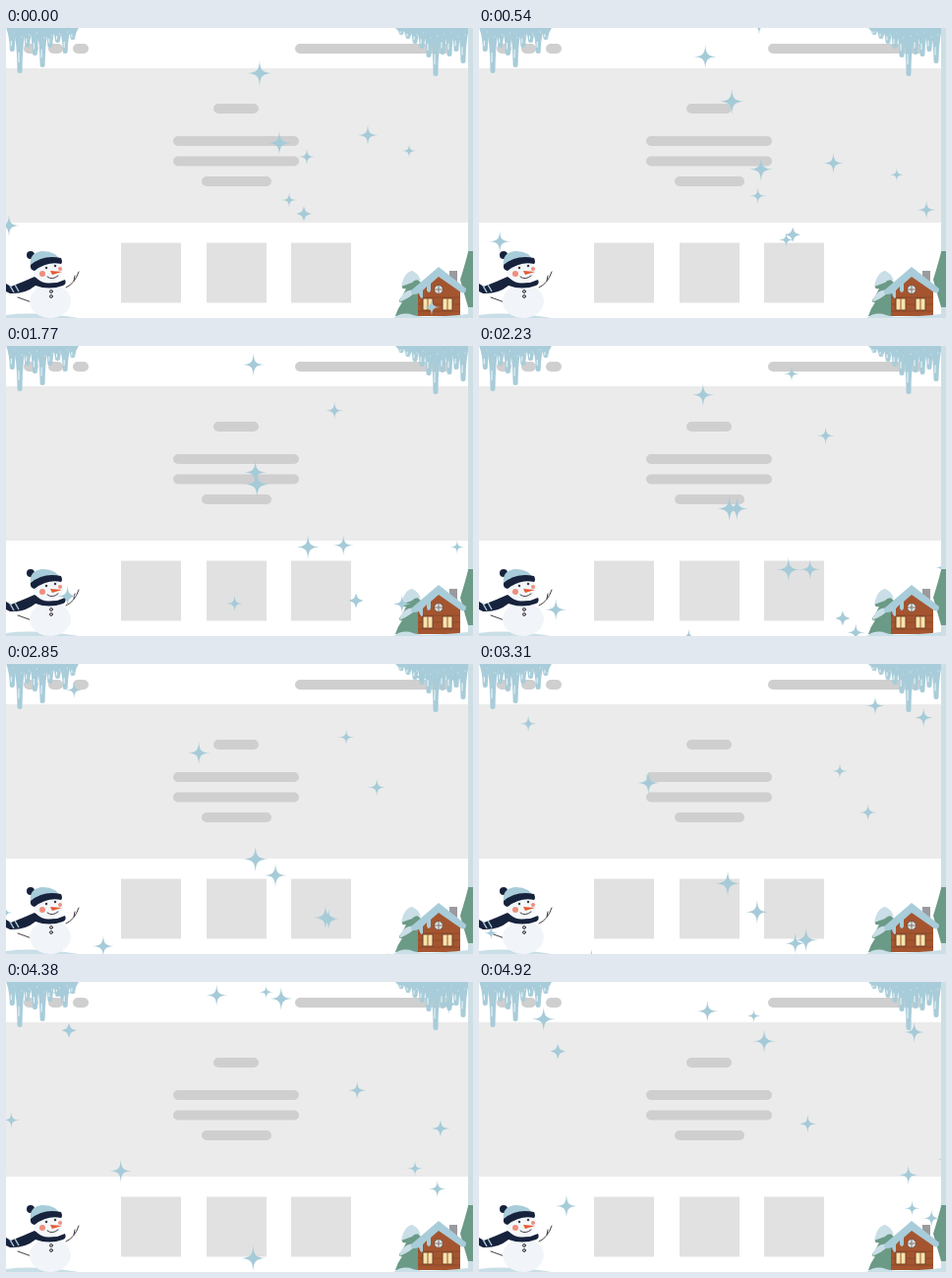
An HTML page that plays this animation: 475 px wide and 295 px high, repeating every 5000 ms.

```html
<!DOCTYPE html>
<html lang="en">
<head>
<meta charset="utf-8">
<title>Winter page decoration</title>
<style>
html, body { margin: 0; width: 100%; height: 100%; overflow: hidden; background: #fff; }
svg { display: block; width: 475px; height: 295px; }
.ice { fill: #a8ccd9; }
.snow { fill: #c9dee6; }
.navy { fill: #17223c; }
.pine { fill: #6b9a86; }
.line { fill: none; stroke: #443e45; stroke-linecap: round; }
</style>
</head>
<body>
<svg viewBox="0 0 475 295">
  <!-- page skeleton -->
  <path d="M0 41H470V198H0Z" fill="#ebebeb"/>
  <path d="M23 21h5M48 21h5M73 21h6M299 21h148M216 82h36M175 115h118M175 135.5h118M204 156h61"
        stroke="#cfcfcf" stroke-width="10" stroke-linecap="round"/>
  <path d="M117 249h61M204 249h61M290 249h61" stroke="#e1e1e1" stroke-width="61"/>
  <g id="icicles"></g>

  <!-- snowman -->
  <path class="snow" d="M0 292Q30 288 74 295H0Z"/>
  <path class="line" d="M61 264Q70 260 74 248M69 257L70 252M26 279L12 274"/>
  <ellipse cx="45" cy="278" rx="21" ry="17" fill="#f1f5f9"/>
  <path class="navy" d="M29 253Q44 264 60 256Q62 260 58 262Q44 267 30 262Q19 271 4 270L0 268V260L5 263Q18 258 29 253Z"/>
  <path d="M4 262l4 7M9 261l4 7" stroke="#a9c9d6" stroke-width="1.5"/>
  <ellipse cx="43" cy="246" rx="15" ry="13.500" fill="#f4f7fa"/>
  <circle class="navy" cx="25" cy="231" r="4"/>
  <path class="ice" d="M25 242Q23 229 36 227Q51 226 56 238Z"/>
  <path class="navy" d="M25 241Q38 230 56 234Q58 238 56 240Q42 237 29 247Q24 246 25 241Z"/>
  <circle cx="37" cy="250" r="3" fill="#ef8e7d"/>
  <circle cx="55" cy="245" r="2" fill="#ef8e7d"/>
  <path d="M45 247L57 248L47 251Z" fill="#e65a32"/>
  <path class="line" d="M41 244v.1M50 242v.1" stroke-width="2.500"/>
  <path class="line" d="M42 253Q47 257 53 252M46 268v.1M46 273v.1"/>
  <g class="line"><circle cx="46" cy="268" r="1.500"/><circle cx="46" cy="273" r="1.500"/></g>

  <!-- cabin and trees -->
  <path class="pine" d="M413 247Q418 257 426 262L432 293H396Q398 286 403 279Q399 280 400 277Q404 272 407 265Q402 266 403 262Q409 256 413 247Z"/>
  <path class="snow" d="M402 263Q405 248 413 247Q419 249 422 257Q416 255 413 259ZM400 279Q404 264 418 267Q412 274 400 279Z"/>
  <path class="pine" d="M470 228Q467 240 462 256L470 284Z"/>
  <path d="M451 247h8v16h-8z" fill="#9b9a9e"/>
  <path d="M419 268L440 249L462 268V293H419Z" fill="#a4552f"/>
  <path d="M419 274H462M419 281H462M419 288H462" stroke="#8b4527" stroke-width=".8"/>
  <path class="ice" d="M440 243L468 265Q468 271 463 269L440 253L432 260V267Q430 271 428 267V263L424 267V274Q422 277 420 270Q411 273 412 267Z"/>
  <circle cx="440" cy="266" r="4.500" fill="#d2e5e8" stroke="#7d4b39"/>
  <path d="M440 262v8M436 266h8" stroke="#7d4b39" stroke-width=".7"/>
  <path d="M424 275h10v12h-10zM444 275h10v12h-10z" fill="#f5e5ae" stroke="#74402d"/>
  <path d="M429 275v12M449 275v12" stroke="#a4552f"/>
  <path class="snow" d="M394 295Q404 288 414 292T470 291V295Z"/>

  <g id="stars" fill="#a6cbd8"></g>

  <!-- right edge -->
  <path d="M470 0H475V295H470Z" fill="#cddfe5"/>
  <path class="pine" d="M470 227H475V284H470Z"/>
</svg>
<script>
const WIDTH = 475, HEIGHT = 298, LOOP = 5000, TICKS = 65, STEP = LOOP / TICKS;

function add(parent, attributes) {
  const path = document.createElementNS("http://www.w3.org/2000/svg", "path");
  for (const name in attributes) path.setAttribute(name, attributes[name]);
  document.getElementById(parent).append(path);
  return path;
}

// A row of drips, each flaring into its neighbours at the top.
function icicles(left, pitch, lengths) {
  lengths.forEach((length, i) => {
    const x = left + i * pitch, bend = length * 0.4;
    add("icicles", { class: "ice", d:
      `M${x - 6} 0H${x + 6}Q${x + 2.7} ${bend} ${x + 2.5} ${length - 2.5}` +
      `a2.5 2.5 0 0 1-5 0Q${x - 2.7} ${bend} ${x - 6} 0` });
    add("icicles", { stroke: "#eef8fa", "stroke-linecap": "round", d:
      `M${x - 1} ${length * 0.55}V${length * 0.75}M${x + 2} ${4 + i * 5 % 7}v.1` });
  });
}
icicles(6.3, 7.7, [24, 46, 20, 28, 40, 20, 15, 26, 12]);
icicles(402, 7, [7, 11, 16, 21, 30, 49, 27, 29, 24, 36]);

// Start point, velocity in px/s and the column where the star comes back in
// at the top. Listed from large to small: the radius shrinks by a fixed amount.
const stars = [
  { from: [258, 46], speed: [-1.5, 53.6] },
  { from: [278, 117], speed: [16.5, 49.5], back: 49 },
  { from: [220, -14], speed: [19, 80.5], back: 273 },
  { from: [343, -98], speed: [-51.6, 66.2] },
  { from: [3, 201], speed: [33.7, 30.2], back: 187 },
  { from: [368, 109], speed: [-14, 53], back: 459 },
  { from: [484, -236], speed: [-9.6, 87.8] },
  { from: [478, 151], speed: [-42.5, 63], back: 438 },
  { from: [433, 284], speed: [40, 55.3], back: 280 },
  { from: [306, 131], speed: [-41.5, 74], back: 89 },
  { from: [288, 175], speed: [45.5, 75], back: 296 },
  { from: [303, 189], speed: [30, 39.5], back: 21, plump: true },
  { from: [410, 125], speed: [27.6, 45], back: 254 }
].map((star, i) => {
  const k = star.plump ? 0.3 : 0.06;
  const d = `M0-1C${k}-.2 .2 ${-k} 1 0C.2 ${k} ${k} .2 0 1C${-k} .2-.2 ${k}-1 0C-.2 ${-k} ${-k}-.2 0-1Z`;
  return { ...star, r: 13 - i / 2, path: add("stars", { d }) };
});

function position({ from, speed, back, r }, seconds) {
  let x = from[0] + speed[0] * seconds;
  let y = from[1] + speed[1] * seconds;
  if (y > HEIGHT + r) {
    y -= HEIGHT + 2 * r;
    x = (back ?? x) + speed[0] * (y + r) / speed[1];
  }
  const span = WIDTH + 2 * r;
  return [(x + r + span) % span - r, y];
}

function draw(now) {
  // Motion advances in discrete ticks; tick times are rounded to 10 ms.
  const tick = Math.floor((now % LOOP + 5) / STEP) % TICKS;
  for (const star of stars) {
    const [x, y] = position(star, tick * STEP / 1000);
    star.path.setAttribute("transform", `translate(${x} ${y}) scale(${star.r})`);
  }
}

const start = performance.now();
function frame() {
  draw(performance.now() - start);
  requestAnimationFrame(frame);
}
frame();
</script>
</body>
</html>
```
